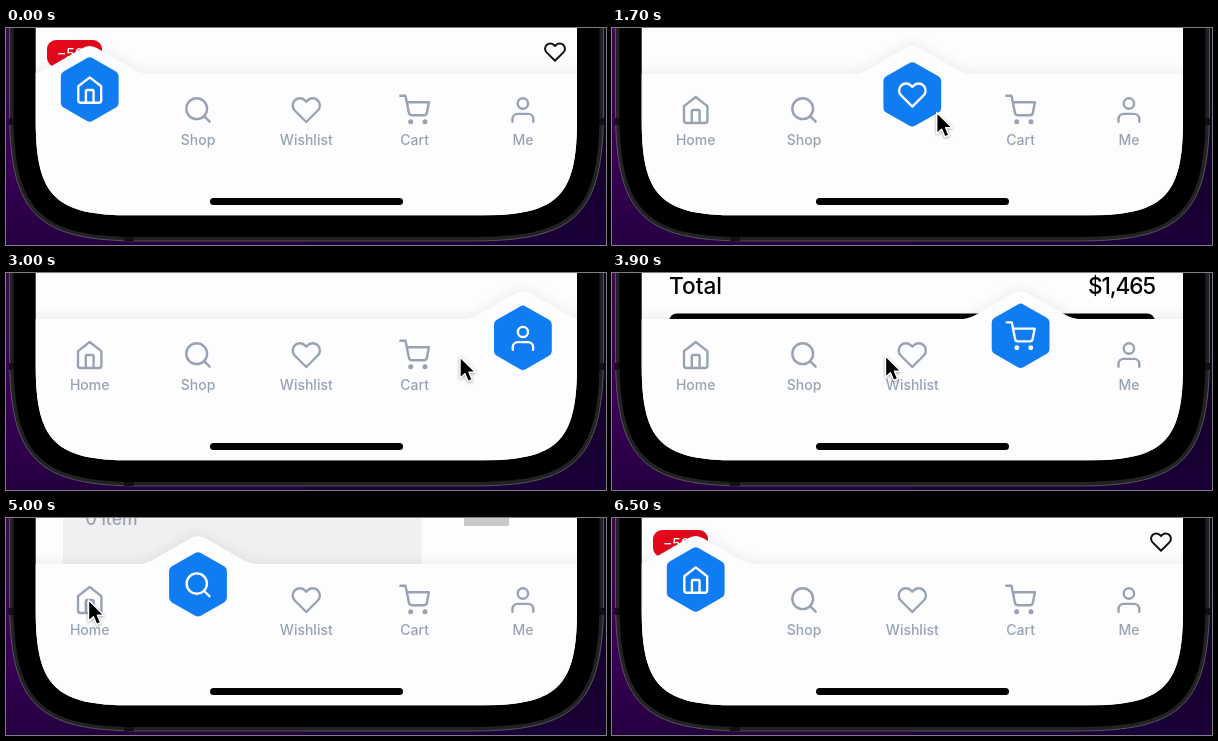
These frames come from a looping animation (600 by 217 pixels, 7.3 s). An HTML page:

```html
<!DOCTYPE html>
<html lang="en">
<head>
<meta charset="utf-8">
<title>Tab bar</title>
<style>
  html, body { margin: 0; width: 100%; height: 100%; overflow: hidden; background: #10001d; }
  svg { display: block; width: 100%; height: 100%; }
  text { font-family: Inter, "Open Sans", sans-serif; font-weight: 500; }
  .icon { fill: none; stroke: #98a2b3; stroke-width: 1.85; stroke-linecap: round; stroke-linejoin: round; }
  .label { fill: #98a2b3; font-size: 14px; text-anchor: middle; }
  .total { font-size: 22.6px; }
  .bar { fill: #fdfdff; filter: drop-shadow(0 -2px 6px rgba(20, 20, 40, .07)); }
  #hex path { fill: #0f7cf2; stroke: #0f7cf2; stroke-width: 11; stroke-linejoin: round; }
  #hex use { stroke: #fff; }
</style>
</head>
<body>
<svg viewBox="0 0 600 217">
  <defs>
    <linearGradient id="glowLeft" x1="0" y1="0" x2="0" y2="1">
      <stop offset="0" stop-color="#3c0a4c"/><stop offset=".6" stop-color="#3a0055"/><stop offset="1" stop-color="#240040"/>
    </linearGradient>
    <linearGradient id="glowRight" x1="0" y1="0" x2="0" y2="1">
      <stop offset="0" stop-color="#0c0416"/><stop offset="1" stop-color="#1a0038"/>
    </linearGradient>
    <clipPath id="screen"><path id="screenEdge"/></clipPath>

    <path id="home" d="M3 9l9-7 9 7v11a2 2 0 0 1-2 2H5a2 2 0 0 1-2-2zM9 22v-9q0-1 1-1h4q1 0 1 1v9"/>
    <path id="shop" d="M19 11a8 8 0 1 1-16 0a8 8 0 1 1 16 0M21 21l-4.35-4.35"/>
    <path id="wishlist" d="M20.84 4.61a5.5 5.5 0 0 0-7.78 0L12 5.67l-1.06-1.06a5.5 5.5 0 0 0-7.78 7.78L12 21.23l8.84-8.84a5.5 5.5 0 0 0 0-7.78z"/>
    <path id="cart" d="M1 1h4l2.68 13.39a2 2 0 0 0 2 1.61h9.72a2 2 0 0 0 2-1.61L23 6H6M10 21a1 1 0 1 1-2 0a1 1 0 1 1 2 0M21 21a1 1 0 1 1-2 0a1 1 0 1 1 2 0"/>
    <path id="me" d="M20 21v-2a4 4 0 0 0-4-4H8a4 4 0 0 0-4 4v2M16 7a4 4 0 1 1-8 0a4 4 0 1 1 8 0"/>
  </defs>

  <rect width="300" height="217" fill="url(#glowLeft)"/>
  <rect x="300" width="300" height="217" fill="url(#glowRight)"/>

  <path id="rim" fill="#222224" stroke="#55555a"/>
  <path d="M3 90h5v7h-5zM593 90h5v7h-5zM118 209h10v4h-10z" fill="#111"/>
  <path id="bezel"/>

  <g clip-path="url(#screen)">
    <rect x="29" width="543" height="188" fill="#fdfdfe"/>

    <g data-page="home">
      <rect x="41" y="12" width="55" height="27" rx="9" fill="#e3091a"/>
      <text x="51" y="30.5" font-size="14" fill="#fff">−50%</text>
      <use href="#wishlist" class="icon" style="stroke:#111;stroke-width:2.1" transform="translate(537.6 12.6) scale(.95)"/>
    </g>
    <g data-page="shop">
      <rect x="57" width="358.5" height="60" fill="#f0f0f2"/>
      <text x="79.5" y="7" font-size="17.5" fill="#9aa1b0">0 item</text>
      <rect x="458" width="45" height="8" fill="#cacacc"/>
    </g>
    <g data-page="cart">
      <text class="total" x="57" y="21">Total</text>
      <text class="total" x="543" y="21" text-anchor="end" letter-spacing="-1.1">$1,465</text>
      <rect x="57" y="40.5" width="486" height="40" rx="8"/>
    </g>

    <g class="bar">
      <rect x="20" y="46" width="562" height="160"/>
      <path id="bump" d="M-62 46.5Q-53 46-46 42.5L-8 20.5Q0 15.5 8 20.5L46 42.5Q53 46 62 46.5z"/>
    </g>
    <g id="tabs"></g>
    <g id="hex">
      <path d="M0-26.6L23.4-13.3V13.3L0 26.6L-23.4 13.3V-13.3z"/>
      <use id="hexIcon" class="icon" transform="translate(-15.2 -14.7) scale(1.27)"/>
    </g>
    <rect x="204" y="170" width="193" height="7" rx="3.5"/>
  </g>

  <g id="cursor">
    <path d="M0 0V22.5L5.2 17.8L8.7 26L13 24.2L9.5 16.2H16.5z" fill="#000" stroke="#fff" stroke-width="1.5"
          stroke-linejoin="round" transform="scale(.94)" style="filter:drop-shadow(0 1px 1.5px rgba(0,0,0,.35))"/>
  </g>
</svg>
<script>
  const LOOP = 7300, TICK = 100, RISE = 450;
  const TABS = ["home", "shop", "wishlist", "cart", "me"];
  const tabX = name => 83.7 + 108.3 * TABS.indexOf(name);

  // [time, selected tab]
  const CLICKS = [[-1000, "home"], [900, "shop"], [1450, "wishlist"], [2090, "cart"], [2712, "me"],
    [3550, "cart"], [4060, "wishlist"], [4748, "shop"], [5250, "home"]];

  // [time, x, y] of the pointer tip
  const POINTER = [[0, 130, 222], [800, 195, 88], [900, 202, 88], [1000, 240.5, 86.5], [1300, 296, 86],
    [1600, 298, 86], [2000, 405, 80], [2200, 425, 79], [2300, 477, 77], [2500, 530, 83],
    [2800, 526, 83], [3000, 454, 84], [3200, 408, 84], [3600, 404, 84], [3900, 273.5, 83],
    [4300, 270, 83], [4500, 182, 86], [4800, 180, 86], [5000, 82.5, 82], [5400, 84, 84],
    [5700, 115, 112], [6000, 340, 90], [6300, 596, 14], [6500, 596, 14]];

  const byId = id => document.getElementById(id);
  const place = (el, x, y) => el.setAttribute("transform", `translate(${x} ${y})`);

  // Phone outline, open at the top, with continuous-curvature bottom corners.
  function outline(id, left, right, bottom, radius) {
    const reach = radius * 1.46, near = reach * .205;
    byId(id).setAttribute("d", `M${left}-20V${bottom - reach}
      C${left} ${bottom - near} ${left + near} ${bottom} ${left + reach} ${bottom}
      H${right - reach}C${right - near} ${bottom} ${right} ${bottom - near} ${right} ${bottom - reach}V-20z`);
  }
  outline("rim", 3.5, 597.5, 213, 90);
  outline("bezel", 7.5, 593.5, 209, 86);
  outline("screenEdge", 29.7, 571, 187.3, 65);

  byId("tabs").innerHTML = TABS.map(name => `<g data-tab="${name}">
    <use href="#${name}" class="icon" transform="translate(${tabX(name) - 15.6} 66.4) scale(1.3)"/>
    <text class="label" x="${tabX(name)}" y="117">${name[0].toUpperCase() + name.slice(1)}</text></g>`).join("");
  const tabs = document.querySelectorAll("[data-tab]");
  const pages = document.querySelectorAll("[data-page]");
  const show = (el, on) => el.style.display = on ? "" : "none";

  function pointerAt(t) {
    const i = POINTER.findIndex(key => key[0] > t);
    const [t0, x0, y0] = POINTER[i - 1], [t1, x1, y1] = POINTER[i];
    const p = (t - t0) / (t1 - t0);
    return [x0 + (x1 - x0) * p, y0 + (y1 - y0) * p];
  }

  function draw(t) {
    const [since, active] = CLICKS.findLast(click => click[0] <= t);
    const p = Math.min(1, (t - since) / RISE);
    const eased = Math.sin(p * Math.PI / 2);

    tabs.forEach(el => show(el, el.dataset.tab !== active));
    pages.forEach(el => show(el, el.dataset.page === active));
    place(byId("bump"), tabX(active), 0);
    place(byId("hex"), tabX(active), 82.5 - 21 * eased);
    byId("hex").style.opacity = Math.min(1, .54 + p);
    byId("hexIcon").setAttribute("href", "#" + active);

    const visible = t > 0 && t < 6500;
    show(byId("cursor"), visible);
    if (visible) place(byId("cursor"), ...pointerAt(t));
  }

  const start = performance.now();
  function frame() {
    const t = (performance.now() - start) % LOOP;
    draw(Math.floor(t / TICK) * TICK);
    requestAnimationFrame(frame);
  }
  draw(0);
  requestAnimationFrame(frame);
</script>
</body>
</html>
```
